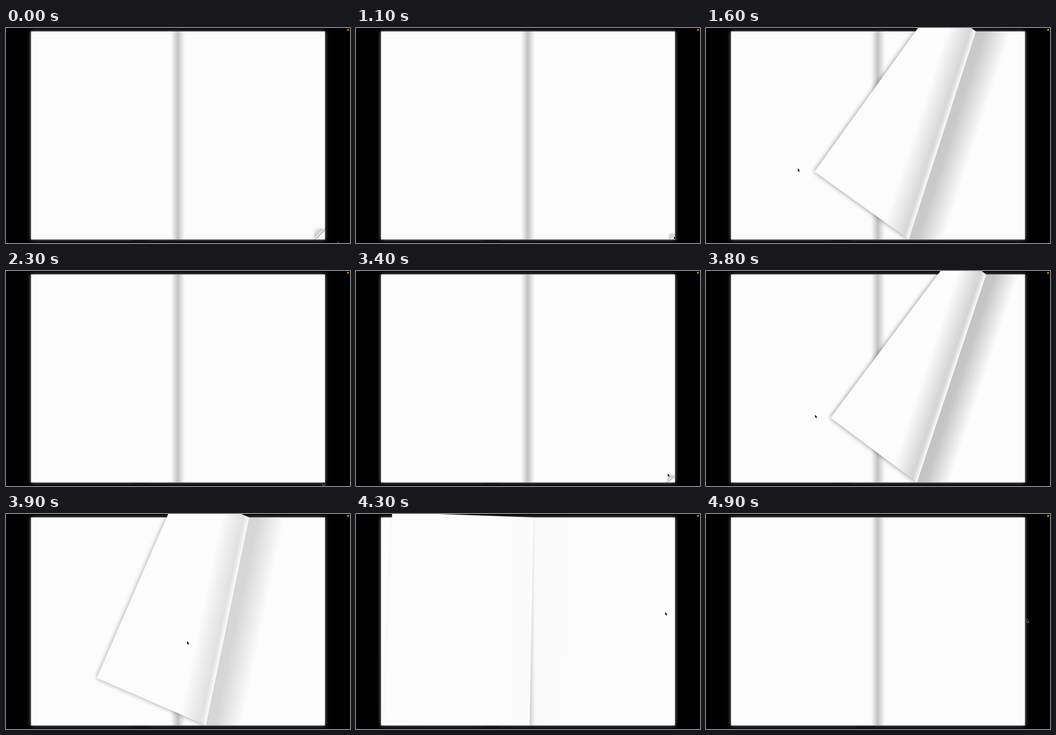
Animation of 600x375 px, one loop 5000 ms. Source, as an HTML page:

```html
<!DOCTYPE html>
<html lang="en">
<head>
<meta charset="utf-8">
<title>Page turn</title>
<style>
  html, body { margin: 0; width: 100%; height: 100%; overflow: hidden; background: #000; }
  svg { display: block; width: 100vw; height: 100vh; }
</style>
</head>
<body>
<svg viewBox="0 0 600 375">
  <defs>
    <linearGradient id="gutter">
      <stop offset="0" stop-opacity="0"/>
      <stop offset=".48" stop-opacity=".23"/>
      <stop offset="1" stop-opacity="0"/>
    </linearGradient>
    <linearGradient id="curl" gradientUnits="userSpaceOnUse">
      <stop offset="0" stop-opacity="0"/>
      <stop offset=".8" stop-opacity=".2"/>
      <stop offset="1" stop-color="#fff" stop-opacity=".2"/>
    </linearGradient>
    <linearGradient id="cast" gradientUnits="userSpaceOnUse">
      <stop offset="0" stop-opacity=".28"/>
      <stop offset=".25" stop-opacity=".27"/>
      <stop offset="1" stop-opacity="0"/>
    </linearGradient>
    <filter id="glow" x="-10%" y="-10%" width="120%" height="120%"><feGaussianBlur stdDeviation="3"/></filter>
    <filter id="soft" filterUnits="userSpaceOnUse" x="-100" y="-100" width="800" height="600">
      <feGaussianBlur stdDeviation="4.5"/>
    </filter>
    <clipPath id="flapSide"><polygon id="flapSidePoly"/></clipPath>
  </defs>

  <rect width="600" height="375"/>
  <rect x="43.5" y="6" width="513" height="363" fill="#909090" filter="url(#glow)"/>
  <rect id="bar" x="219" y="370" width="33" height="2" opacity=".3"/>
  <rect x="43.7" y="6" width="512.6" height="362.8" fill="#fcfcfc"/>
  <rect x="288" y="6" width="24" height="362.8" fill="url(#gutter)"/>

  <g id="fold">
    <polygon id="revealed" fill="url(#cast)"/>
    <g clip-path="url(#flapSide)">
      <polygon id="shadow" filter="url(#soft)"/>
      <polygon id="flap" fill="#fcfcfc"/>
      <polygon id="flapShade" fill="url(#curl)"/>
    </g>
  </g>

  <circle id="dot" cx="596.6" cy="3.2" r="1.6"/>
  <path id="cursor" d="M0 0V5.4L1.2 4.3L2.1 6.3L3 5.9L2.2 4H3.8Z" stroke="#fff" stroke-width=".7" paint-order="stroke"/>
</svg>
<script>
const LOOP = 5000, STEP = 100;
const LEFT = 44, RIGHT = 556.3, TOP = 6, BOTTOM = 368.8, WIDTH = 256;
const HOME = [RIGHT, BOTTOM];

const el = id => document.getElementById(id);
const put = (id, attrs) => {
  for (const name in attrs) el(id).setAttribute(name, attrs[name]);
};
const polygon = (id, points) => put(id, { points: points.map(p => p.join()).join(" ") });

const mix = (a, b, u) => a + (b - a) * u;
const move = (a, b, u, v = u) => [mix(a[0], b[0], u), mix(a[1], b[1], v)];
const phase = (t, from, to) => Math.min(1, Math.max(0, (t - from) / (to - from)));
const easeOut = (u, power) => 1 - (1 - u) ** power;

// Corner positions: a small diagonal peel, or a drag along an arc to the left.
const peel = size => [RIGHT - size, BOTTOM - size];
const pull = s => [RIGHT - 386 * s, BOTTOM - 122 * s ** 0.6];

const swing = t => Math.sin(Math.PI * phase(t, 1200, 1900)) ** 2;
const grab = t => 0.03 + 0.848 * phase(t, 3400, 3800) ** 4;

function cornerAt(t) {
  if (t <= 1200) return peel(mix(19, 11, phase(t, 0, 1100)));
  if (t < 1900) return pull(swing(t));
  if (t < 3200) return peel(19 * phase(t, 2400, 2800));
  if (t < 3800) return pull(grab(t));
  if (t >= 4500) return HOME;
  const u = phase(t, 3800, 4500);
  return move(pull(grab(3800)), [LEFT, BOTTOM], easeOut(u, 2.7), easeOut(u, 2));
}

function cursorAt(t) {
  const edge = [554.5, 363], below = [552.5, 368], hover = [546, 357], side = [539.3, 171];
  const lead = s => pull(s * 1.08);
  if (t <= 1200) return move([579, 373.5], edge, easeOut(phase(t, 0, 1100), 2));
  if (t < 1900) return lead(swing(t));
  if (t < 3200) return move(below, hover, phase(t, 2300, 2800));
  if (t < 3800) return lead(grab(t));
  if (t < 4300) return move(lead(grab(3800)), side, easeOut(phase(t, 3800, 4300), 2));
  return move(side, [559.5, 183.5], easeOut(phase(t, 4300, 4800), 2));
}

function drawFold([px, py]) {
  const dx = RIGHT - px, dy = BOTTOM - py, reach = Math.hypot(dx, dy);
  el("fold").style.display = reach < 1 ? "none" : "";
  if (reach < 1) return;

  // The crease is the perpendicular bisector between the corner and its home.
  const nx = dx / reach, ny = dy / reach;
  const mx = (px + RIGHT) / 2, my = (py + BOTTOM) / 2;
  const along = (s, side = 0) => [mx + ny * s + nx * side, my - nx * s + ny * side];
  const creaseX = y => mx - ny * (y - my) / nx;
  const mirror = ([x, y]) => {
    const d = 2 * ((x - mx) * nx + (y - my) * ny);
    return [x - d * nx, y - d * ny];
  };

  const low = [creaseX(BOTTOM), BOTTOM];
  const topX = creaseX(TOP);
  const lifted = topX < RIGHT
    ? [low, [topX, TOP], [RIGHT, TOP], HOME]
    : [low, [RIGHT, my - nx * (RIGHT - mx) / ny], HOME];
  const flap = lifted.map(mirror);

  polygon("revealed", lifted);
  for (const id of ["shadow", "flap", "flapShade"]) polygon(id, flap);
  polygon("flapSidePoly", [along(-900), along(900), along(900, -900), along(-900, -900)]);

  const half = reach / 2;
  const gradient = (id, from, to) => {
    const [x1, y1] = along(0, from), [x2, y2] = along(0, to);
    put(id, { x1, y1, x2, y2 });
  };
  gradient("curl", -Math.min(48, half), 0);
  gradient("cast", 0, half * 0.3);

  const far = Math.hypot(px - LEFT, py - BOTTOM) / WIDTH;
  const strength = Math.min(1, far);
  put("flapShade", { opacity: strength });
  put("revealed", { opacity: strength });
  put("shadow", { opacity: 0.5 * Math.max(0, Math.sin(Math.PI / 2 * (far > 1 ? 2 - far : far))) });
}

function draw(now) {
  const t = Math.floor(now % LOOP / STEP) * STEP;
  drawFold(cornerAt(t));
  put("cursor", { transform: `translate(${cursorAt(t)})` });
  put("dot", { fill: t < 1300 ? "#f58a1f" : "#e0983a" });
  put("bar", { x: t < 4400 ? 219 : 262 });
}

let start;
function tick(now) {
  start ??= now;
  draw(now - start);
  requestAnimationFrame(tick);
}
draw(0);
requestAnimationFrame(tick);
</script>
</body>
</html>
```
